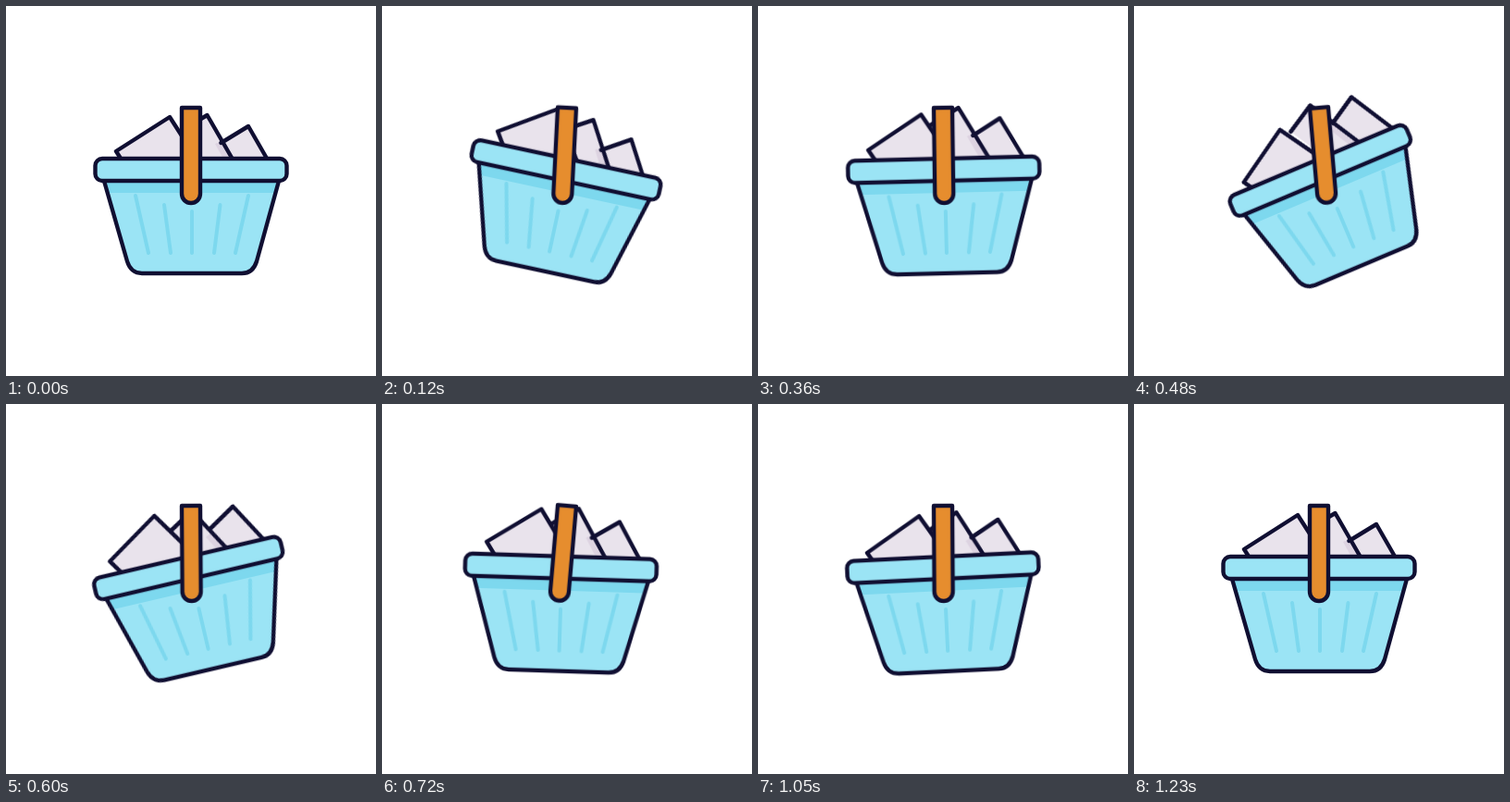
An HTML page that plays this animation: 400 px wide and 400 px high, repeating every 1260 ms.

```html
<!DOCTYPE html>
<html lang="en">
<head>
<meta charset="utf-8">
<title>Swinging basket</title>
<style>
html, body { margin: 0; width: 100%; height: 100%; overflow: hidden; background: #fff; }
svg { display: block; width: 100vw; height: 100vh; }

.line { stroke: #100f32; stroke-width: 4.4; stroke-linejoin: round; stroke-linecap: round; }
.open { fill: none; }
.paper { fill: #e9e3ec; }
.shade { fill: #ddd3e1; }
.tub { fill: #9be4f5; }
.band { fill: #7dd8ee; }
.ribs { fill: none; stroke: #7dd8ee; stroke-width: 4; stroke-linecap: round; }
.grip { fill: #e68d2e; }

.swing, .level, .tilt, .left, .mid, .right {
  animation: 1260ms cubic-bezier(.37, 0, .63, 1) infinite;
}
/* The basket hangs from the handle; .level cancels the handle's angle. */
.swing { --dir: 1; transform-origin: 200px 110px; animation-name: swing; }
.level { --dir: -1; transform-origin: 200px 192px; animation-name: swing; }
.tilt { transform-origin: 200px 192px; animation-name: tilt; }
.left { animation-name: left; }
.mid { animation-name: mid; }
.right { animation-name: right; }

@keyframes swing {
  0%, 96.8%, 100% { transform: rotate(0deg); }
  17.5% { transform: rotate(calc(var(--dir) * 5deg)); }
  37.8% { transform: rotate(calc(var(--dir) * -5deg)); }
  58.8% { transform: rotate(calc(var(--dir) * 5.1deg)); }
  83.3% { transform: rotate(calc(var(--dir) * -.4deg)); }
}
@keyframes tilt {
  0%, 97%, 100% { transform: rotate(0deg); }
  18.4% { transform: rotate(22.7deg); }
  38.2% { transform: rotate(-22.9deg); }
  61% { transform: rotate(3.5deg); }
  80.3% { transform: rotate(-3deg); }
}
@keyframes left {
  0%, 35.7%, 77.8%, 100% { transform: translateY(0); }
  17.9% { transform: translateY(-9.4px); }
  49.2% { transform: translateY(-6.6px); }
}
@keyframes mid {
  0%, 11.9%, 49.2%, 82.5%, 100% { transform: translateY(0); }
  37.3% { transform: translateY(-10.2px); }
  66.7% { transform: translateY(-11.5px); }
}
@keyframes right {
  0%, 18.3%, 90.5%, 100% { transform: translateY(0); }
  37.7% { transform: translateY(-13px); }
  54.8% { transform: translateY(-3.5px); }
  67.5% { transform: translateY(-10px); }
}
</style>
</head>
<body>
<svg viewBox="0 0 400 400">
  <g class="swing">
    <g class="level">
      <g class="tilt">
        <path class="right paper" d="M232.5 148L262 130L293 184L263.5 202Z"/>
        <g class="mid">
          <path class="paper" d="M187 136L217.5 118L262.5 196L232 214Z"/>
          <path class="shade" d="M226 149L233 146L244 165L255 185H246Z"/>
          <path class="line open" d="M187 136L217.5 118L262.5 196"/>
        </g>
        <path class="right line open" d="M232.5 148L262 130L293 184"/>
        <path class="left paper line" d="M119 157L177 120L209 170L151 207Z"/>
        <path class="tub" d="M106 189L131 276Q135 289 147 289H255Q267 289 271 276L295 189Z"/>
        <path class="band" d="M106 189H295L291 202H110Z"/>
        <path class="ribs" d="M140 205L154 267M171 215L178 267M201 222V267M231.500 215L225 267M262 205L248 267"/>
        <path class="line open" d="M106 189L131 276Q135 289 147 289H255Q267 289 271 276L295 189"/>
        <rect class="tub line" x="96.5" y="165" width="207" height="24" rx="7.5"/>
      </g>
    </g>
    <path class="grip line" d="M190 110H210V203A10 10 0 0 1 190 203Z"/>
  </g>
</svg>
</body>
</html>
```
